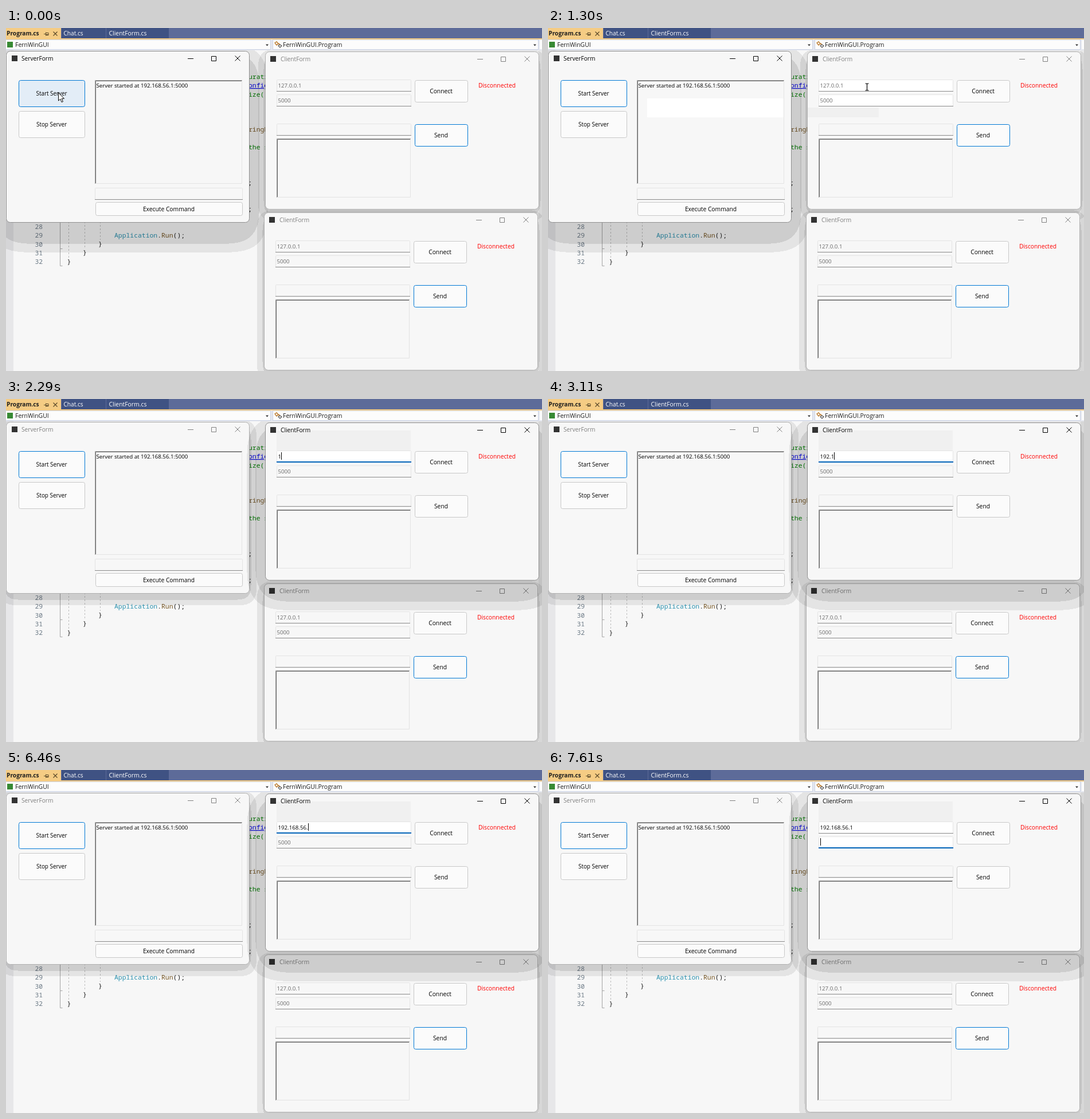
An HTML page for the animation above (8000 ms loop, 935x599 px).

```html
<!DOCTYPE html>
<html lang="en">
<head>
<meta charset="utf-8">
<title>Server and clients</title>
<style>
  html, body { margin: 0; width: 100%; height: 100%; overflow: hidden; background: #f7f7f7; }
  svg { display: block; width: 935px; height: 599px; }
  text { font-family: "Open Sans", "Noto Sans", sans-serif; font-size: 10.3px; white-space: pre; }
  .code { font-family: "Noto Sans Mono", "DejaVu Sans Mono", monospace; font-size: 11.4px; }
</style>
</head>
<body>
<svg id="stage" viewBox="0 0 935 599" xmlns="http://www.w3.org/2000/svg"></svg>
<script>
const LOOP = 8000;
const BLUE = '#0063b8', RING = '#0078d4', FACE = '#f7f7f7', DIM = '#808080';
const PROJECT = 'FernWinGUI';
const stage = document.getElementById('stage');

// [time, typed text, caret visible]
const typing = [
  [1450, '', 1], [2140, '', 0], [2290, '1', 1], [2430, '19', 1], [2710, '192', 1],
  [2830, '192.', 1], [3110, '192.1', 1], [3230, '192.16', 1], [3500, '192.168', 1],
  [3770, '192.168.', 1], [4370, '192.168.', 0], [4800, '192.168.', 1], [5340, '192.168.', 0],
  [5640, '192.168.5', 1], [5910, '192.168.56', 1], [6460, '192.168.56.', 1],
  [6750, '192.168.56.1', 1], [7190, '192.168.56.1', 0]
];
// [time, cursor kind, x, y]
const pointer = [
  [0, 'arrow', 91.5, 113], [560, 'beam', 176.5, 130], [710, 'arrow', 432, 138],
  [840, 'beam', 573.5, 132], [990, 'beam', 562, 109], [1150, 'beam', 556.5, 105],
  [1300, 'beam', 556.5, 103], [2140, 'none', 0, 0]
];
// [time, progress of the focus moving to the second field]
const focusShift = [[0, 0], [7340, .35], [7490, .7], [7610, 1]];

const at = (steps, t) => steps.reduce((now, s) => s[0] <= t ? s : now, null);

const rect = (x, y, w, h, fill, more = '') =>
  `<rect x="${x}" y="${y}" width="${w}" height="${h}" fill="${fill}" ${more}/>`;
const path = (d, stroke, width = 1, more = '') =>
  `<path d="${d}" fill="none" stroke="${stroke}" stroke-width="${width}" ${more}/>`;
const label = (x, y, str, fill = '#000', size = 10.3, more = '') =>
  `<text x="${x}" y="${y}" fill="${fill}" style="font-size:${size}px" ${more}>${str}</text>`;
const code = (x, y, str, fill = '#1e1e1e', more = '') =>
  `<text class="code" x="${x}" y="${y}" fill="${fill}" ${more}>${str}</text>`;

function button(x, y, w, h, str, { size = 10.3, ring = false, hot = false } = {}) {
  return rect(x + .5, y + .5, w - 1, h - 1, hot ? '#e3edf7' : '#fbfbfb',
      `rx="3" stroke="${ring ? RING : '#c8c8c8'}"`) +
    label(x + w / 2 - .5, y + h / 2 + 3.7, str, '#000', size, 'text-anchor="middle"');
}

function field(x, y, w, { text = '', color = '#686868', hot = false, focus = 0 } = {}) {
  return rect(x + .5, y + .5, w - 1, 20, hot || focus ? '#fff' : FACE, 'rx="1" stroke="#e4e4e4"') +
    path(`M${x} ${y + 20.5}h${w}`, '#8a8a8a') +
    (focus ? path(`M${x} ${y + 20}h${w}`, BLUE, 2, `opacity="${focus}"`) : '') +
    label(x + 2.5, y + 13.5, text, color, 9.7);
}

// Sunken edge: two dark lines at the top left, one light line at the bottom right.
const list = (x, y, w, h) =>
  rect(x, y, w, h, FACE) +
  path(`M${x + w - .5} ${y}v${h - .5}H${x}`, '#e3e3e3') +
  path(`M${x + .5} ${y + h}V${y + .5}H${x + w}`, '#a0a0a0') +
  path(`M${x + 1.5} ${y + h - 1}V${y + 1.5}H${x + w - 1}`, '#696969');

const caret = (x, y) => rect(Math.round(x), y, 1, 13, '#000');

const typedWidth = str => [...str].reduce((w, c) => w + (c === '.' ? 2.58 : 5.55), 0);

function frame(x, y, w, h, title, active, dx, tint = '') {
  const ink = active ? '#000' : DIM;
  const cy = y + 13, right = x + w;
  const drop = active ? 20 : 8;
  return rect(x, y + drop, w, h, '#000', `filter="url(#${active ? 'wide' : 'narrow'})"`) +
    rect(x + .5, y + .5, w - 1, h - 1, FACE, `rx="7" stroke="${active ? '#8f8f8f' : '#b0b0b0'}"`) +
    tint +
    rect(x + dx, y + 8, 10, 10, '#333') +
    label(x + 27, y + 17.3, title, ink, 10.2) +
    path(`M${right - 108} ${cy + .5}h10
          M${right - 66.5} ${cy - 3.5}h8v8h-8z
          M${right - 25.5} ${cy - 4.5}l9 9m0 -9l-9 9`, ink);
}

function server(active, hot, tint) {
  return frame(0, 40, 425, 300, 'ServerForm', active, 10) +
    button(22, 91, 116, 47, 'Start Server', { size: 9.9, ring: true, hot }) +
    button(22, 145, 116, 47, 'Stop Server', { size: 9.9 }) +
    list(155, 91, 257, 181) +
    (tint ? rect(173, 123, 238, 33, '#fff') : '') +
    label(157.5, 103.5, 'Server started at 192.168.56.1:5000', '#000', 9.7) +
    field(155, 279, 258) +
    button(156, 304, 257, 24, 'Execute Command');
}

function client(x, y, { active = false, tint = '', host = {}, port = {} } = {}) {
  return frame(x, y, 478, 276, 'ClientForm', active, 9, tint) +
    field(x + 20, y + 49, 235, { text: '127.0.0.1', ...host }) +
    field(x + 20, y + 75, 235, { text: '5000', ...port }) +
    field(x + 20, y + 126, 235) +
    list(x + 20, y + 152, 234, 103) +
    button(x + 261, y + 50, 93, 39, 'Connect') +
    button(x + 261, y + 127, 93, 39, 'Send', { ring: !active }) +
    label(x + 372, y + 62.7, 'Disconnected', '#f00', 10.27);
}

function editor() {
  const rows = [28, 29, 30, 31, 32]
    .map((n, i) => code(50.5, 351 + i * 15.3, n, '#6c7a86')).join('');
  const peeks = [
    [85, 'urati', '#008000'], [100, 'onfig', '#0000ee', 'text-decoration="underline"'],
    [115.5, 'ize()', '#008000'], [177, 'ringB', '#74531f'], [208, 'the s', '#008000'],
    [270, ' ;'], [316, ' ;']
  ].map(([y, str, fill, more]) => code(str[0] === ' ' ? 415.5 : 423, y + 4, str, fill, more)).join('');
  return rect(0, 38, 935, 561, FACE) +
    rect(0, 38, 13, 561, '#e7e7e9') + rect(929, 38, 6, 561, '#e9e9e9') +
    rows + peeks +
    path('M94.5 338V415.5h4M94.5 385.5h4', '#a5a5a5') +
    path('M109.5 338V401M137.5 338V386M164.5 338V370', '#bcbcbc', 1, 'stroke-dasharray="3 3"') +
    code(189, 365.5, '<tspan fill="#2b91af">Application</tspan>.<tspan fill="#74531f">Run</tspan>();') +
    code(161, 381, '}') + code(134, 396.3, '}') + code(106.5, 411.6, '}');
}

function toolbar() {
  const combo = (x, w) => rect(x + .5, 20.5, w - 1, 17, '#fcfcfc', 'stroke="#ccd3e4"') +
    `<path d="M${x + w - 9} 28.5h5l-2.5 3z" fill="#333"/>`;
  return rect(0, 0, 935, 18, '#5d6b99') +
    rect(0, 0, 96, 18, '#f5cc84') +
    rect(97, 0, 77, 18, '#3f5283') + rect(175, 0, 109, 18, '#3f5283') +
    rect(0, 18, 935, 2, '#f5cc84') +
    label(1, 13, 'Program.cs', '#1e1e1e', 10.2, 'font-weight="700"') +
    path('M66 10.5h3M69.5 7.5v6M70 8.5h4v4h-4M70 11.5h4', '#5c4a2a') +
    path('M82.5 6.5l7 7m0 -7l-7 7', '#5c4a2a', 1.2) +
    label(100.5, 13, 'Chat.cs', '#fff', 10.1) +
    label(179.5, 13, 'ClientForm.cs', '#fff', 10.4) +
    rect(0, 20, 935, 19, '#e4e7ef') +
    combo(-1, 463) + combo(465, 464) + rect(931, 21, 4, 16, '#fcfcfc') +
    rect(2, 24, 10, 10, '#388a34') +
    label(16, 33, PROJECT, '#1e1e1e', 10.44) +
    path('M469 26l3 -2 3 3 -3 3z M474 28h4', '#b8772a', 1.4) +
    path('M475 31l3 -2 3 2 -3 3z', '#555', 1.2) +
    label(483, 33, PROJECT + '.Program', '#1e1e1e', 10.44);
}

function cursor([, kind, x, y]) {
  if (kind === 'arrow') {
    return `<path d="M${x} ${y}v14l3.3 -3 2.3 5.5 2.3 -1 -2.2 -5.2h4.3z"
      fill="#fff" stroke="#000" stroke-width="1"/>`;
  }
  if (kind === 'beam') {
    return path(`M${x - 3} ${y - 6}h2.2l.8 .8 .8 -.8h2.2M${x} ${y - 5.5}v11
      M${x - 3} ${y + 6}h2.2l.8 -.8 .8 .8h2.2`, '#000', 1.2);
  }
  return '';
}

// A blurred shadow reduced to a light outer and a darker inner band.
function bandedShadow(id, blur, light, dark) {
  const bands = Array.from({ length: 20 }, (_, i) =>
    i / 20 < light ? 0 : i / 20 < dark ? .08 : .17).join(' ');
  return `<filter id="${id}" x="-30%" y="-30%" width="160%" height="160%">
    <feGaussianBlur stdDeviation="${blur}"/>
    <feComponentTransfer><feFuncA type="discrete" tableValues="${bands}"/></feComponentTransfer>
    <feGaussianBlur stdDeviation=".6"/>
  </filter>`;
}

const defs = `<defs>${bandedShadow('wide', 20, .05, .2)}${bandedShadow('narrow', 10, .1, .4)}</defs>`;
const backdrop = defs + editor();
const header = toolbar();

function scene(t) {
  const entry = at(typing, t);
  const shift = at(focusShift, t)[1];
  const clientActive = t >= 1450;
  const swept = t >= 710 && t < 1450;
  const options = { active: clientActive };
  let carets = '';

  if (entry) {
    options.host = { text: entry[1], color: '#000', hot: true, focus: 1 - shift };
    if (shift) {
      options.port = { text: '', focus: shift };
      carets = caret(474.5, 119);
    } else if (entry[2]) {
      carets = caret(474.5 + typedWidth(entry[1]), 93);
    }
  } else {
    options.host = { hot: t >= 990 };
    options.port = { hot: t >= 840 };
  }
  if (swept) options.tint = rect(453, 139, 124, 17, '#f0f0f0');
  if (t >= 1570) options.tint = rect(472, 55, 234, 35, '#f0f0f0');

  const first = client(452, 41, options);
  const second = client(450, 322);
  const host = server(!clientActive, t < 560, swept);
  const windows = clientActive ? host + second + first : host + first + second;
  return backdrop + windows + header + carets + cursor(at(pointer, t));
}

let shown = '';
function draw(t) {
  const next = scene(t);
  if (next !== shown) stage.innerHTML = shown = next;
}

const start = performance.now();
function tick(now) {
  draw(Math.max(0, now - start) % LOOP);
  requestAnimationFrame(tick);
}
draw(0);
requestAnimationFrame(tick);
</script>
</body>
</html>
```
